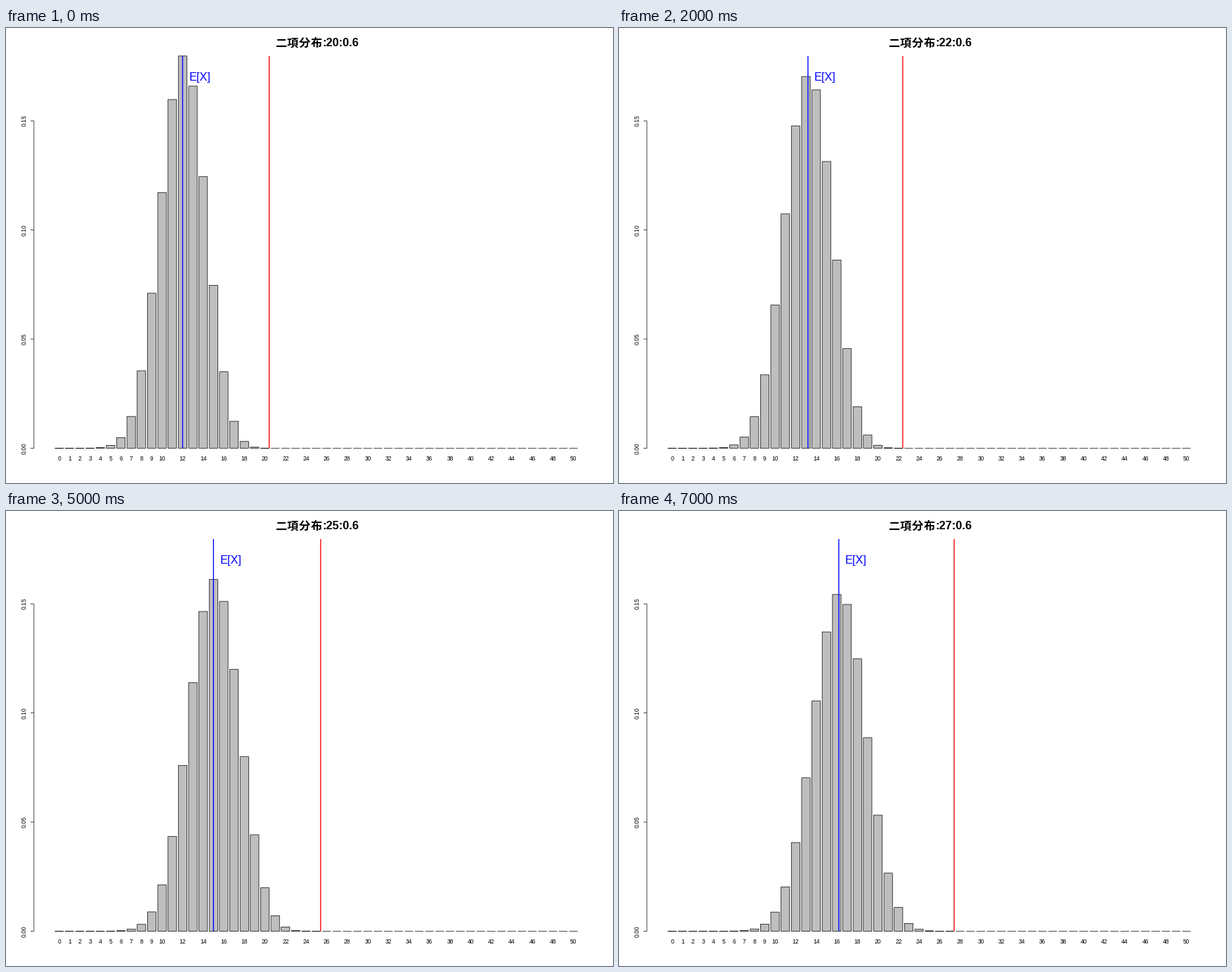
Write a matplotlib script that moves like this. It is 864 px wide and 648 px high and loops after 8000 ms.

```python
import math

import matplotlib.pyplot as plt
from matplotlib.animation import FuncAnimation
from matplotlib.patches import Rectangle

W, H, DPI = 864, 648, 72
LEFT, RIGHT, TOP, BASE = 39.85, 843.59, 39.85, 598.43
P = 0.6
N_FIRST, N_LAST, K_MAX = 20, 27, 50
THIN, THICK = 0.7, 1.35


def pmf(k, n):
    return math.comb(n, k) * P**k * (1 - P) ** (n - k)


# Bars are 1 unit wide with gaps of 0.2; the range is padded by 4 % per side.
SPAN = 1.2 * K_MAX + 1
X_UNIT = (RIGHT - LEFT) / (1.08 * SPAN)
X_START = LEFT + 0.04 * SPAN * X_UNIT
Y_UNIT = (BASE - TOP) / pmf(12, N_FIRST)


def to_x(u):
    return X_START + (u - 0.2) * X_UNIT


def bar_center(k):
    return to_x(0.7 + 1.2 * k)


plt.rcParams["font.family"] = "Liberation Sans"
fig = plt.figure(figsize=(W / DPI, H / DPI), dpi=DPI, facecolor="white")
ax = fig.add_axes([0, 0, 1, 1])
ax.set_xlim(0, W)
ax.set_ylim(H, 0)
ax.axis("off")


def line(xs, ys, color="black", lw=THIN, z=1):
    (art,) = ax.plot(xs, ys, color=color, lw=lw, zorder=z,
                     solid_capstyle="butt", snap=False)
    return art


def label(x, y, text, size, **kw):
    kw = {"ha": "center", "va": "baseline", "zorder": 4, **kw}
    return ax.text(x, y, text, fontsize=size, **kw)


# Axes
line([LEFT, LEFT], [BASE, BASE - 0.15 * Y_UNIT])
for i in range(4):
    y = BASE - 0.05 * i * Y_UNIT
    line([LEFT - 4.86, LEFT], [y, y])
    label(28.6, y, f"{0.05 * i:.2f}", 8.5, rotation=90, rotation_mode="anchor")
for k in [*range(10), *range(10, K_MAX + 1, 2)]:
    label(bar_center(k), 615.6, str(k), 8.5)

# Title: spaced ideographs followed by the parameters
for i, char in enumerate("二項分布"):
    label(382.6 + 16.875 * (i + 0.5), 26.5, char, 16.2, weight="bold",
          family="Noto Sans CJK JP")
params = label(450.2, 26.5, "", 16.4, ha="left", weight="bold")

bars = []
for k in range(K_MAX + 1):
    bar = Rectangle((bar_center(k) - X_UNIT / 2, BASE), X_UNIT, 0,
                    fc="#bebebe", ec="black", lw=THIN, snap=False, zorder=2)
    bars.append(ax.add_patch(bar))

limit = line([0, 0], [TOP, BASE], "red", THICK, 3)
mean = line([0, 0], [TOP, BASE], "blue", THICK, 3)
mean_label = label(0, 74.5, "E[X]", 16.4, color="blue")


def update(frame):
    n = N_FIRST + frame
    for k, bar in enumerate(bars):
        bar.set_height(-pmf(k, n) * Y_UNIT)
    x_limit = to_x(1.2 * (n + 1))
    x_mean = bar_center(n * P)
    limit.set_xdata([x_limit, x_limit])
    mean.set_xdata([x_mean, x_mean])
    mean_label.set_x(x_mean + 2 * X_UNIT)
    params.set_text(f":{n}:{P}")
    return [*bars, limit, mean, mean_label, params]


anim = FuncAnimation(fig, update, frames=N_LAST - N_FIRST + 1, interval=1000,
                     repeat=True, repeat_delay=0)
plt.show()
```
